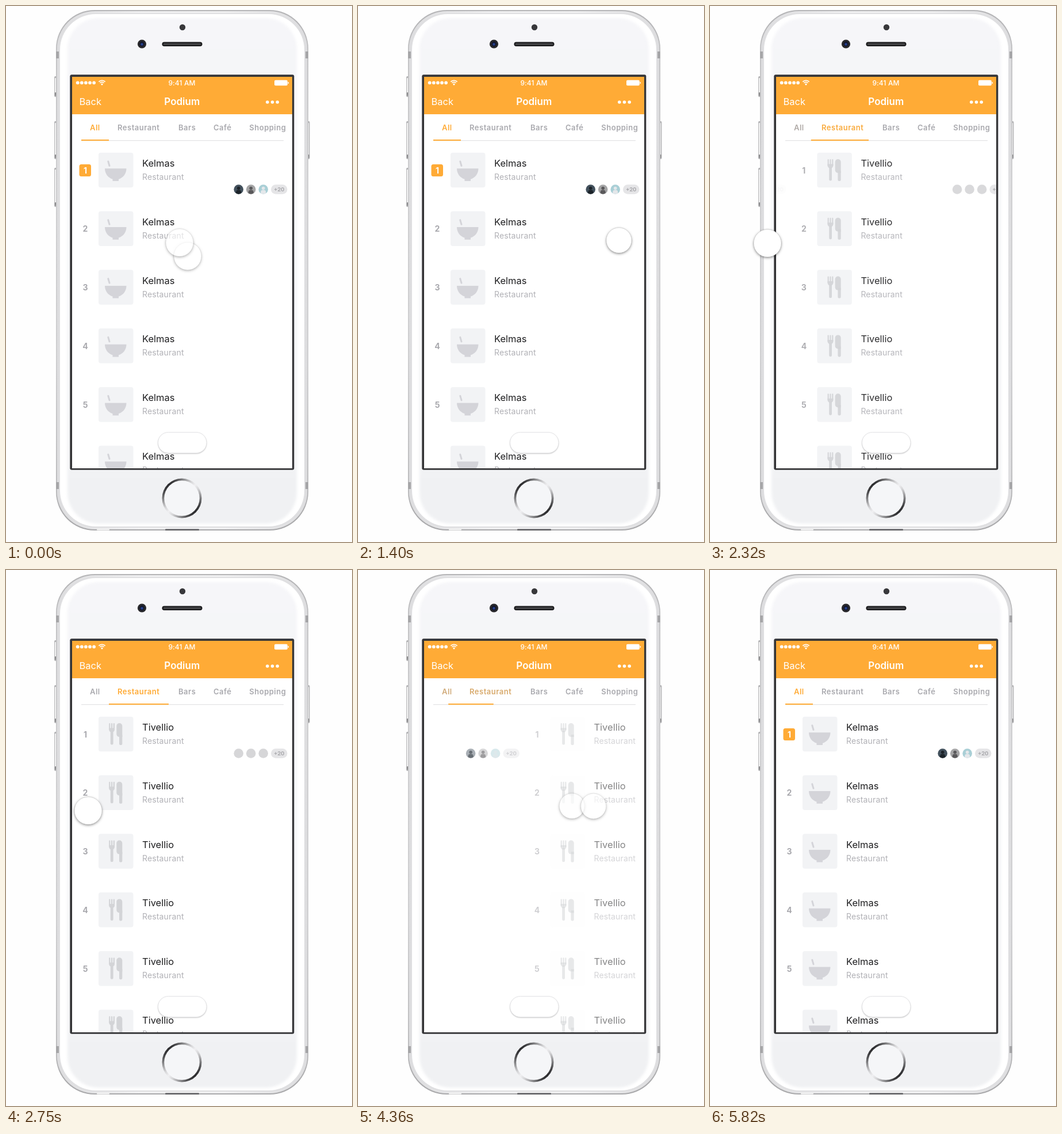
An HTML page with a canvas that plays this animation: 602x931 px, repeating every 6050 ms.

```html
<!DOCTYPE html>
<html lang="en">
<head>
<meta charset="utf-8">
<title>Podium swipe</title>
<style>
html, body { margin: 0; width: 100%; height: 100%; overflow: hidden; background: #fefefe; }
canvas { display: block; width: 602px; height: 931px; }
</style>
</head>
<body>
<canvas id="stage"></canvas>
<script>
const W = 602, H = 931, LOOP = 6050, STEP = 66, TICK = 33;
const ORANGE = [255, 171, 54], GREY = [169, 169, 174];
const FONT = 'Inter, "Liberation Sans", sans-serif';
const SCREEN = { x: 115, y: 123, w: 383, h: 680 };
const PAGE = 382, ROW = 101.8;
const SWIPE = 1780, RETURN = 4088, DRAG = 412, SETTLE = 900;

const canvas = document.getElementById('stage');
const g = canvas.getContext('2d');
const dpr = window.devicePixelRatio || 1;
canvas.width = W * dpr;
canvas.height = H * dpr;

// Legs of the finger's path: begin, end, x, y
const legs = [
  [-66, 0, 302, 411],
  [0, 500, 283, 413],
  [700, 1386, 454, 407],
  [SWIPE, SWIPE + DRAG, 100, 412],
  [2400, 2706, 143, 418],
  [2800, 3560, 179, 408],
  [RETURN, RETURN + DRAG, 496, 411],
  [4900, 5350, 372, 440],
  [5350, 5760, 650, 990]
];

const clamp = u => Math.max(0, Math.min(1, u));
const lerp = (a, b, u) => a + (b - a) * u;
const sway = u => (1 - Math.cos(Math.PI * clamp(u))) / 2;
const glide = u => 1 - (1 - clamp(u) ** 2) ** 7;
const rgb = c => `rgb(${c.map(Math.round).join(',')})`;
const mix = (a, b, u) => rgb(a.map((v, i) => lerp(v, b[i], u)));

const pageAt = t => glide((t - SWIPE - 20) / SETTLE) - glide((t - RETURN - 9) / SETTLE);

function fingerAt(t) {
  let x = 330, y = 458;
  for (const [from, to, nx, ny] of legs) {
    const u = sway((t - from) / (to - from));
    x = lerp(x, nx, u);
    y = lerp(y, ny, u);
  }
  const held = [SWIPE, RETURN].some(s => t > s - 470 && t < s + DRAG);
  return { x, y, r: held ? 22.5 : 24.5 };
}

function box(x, y, w, h, r, fill) {
  g.beginPath();
  g.roundRect(x, y, w, h, r);
  g.fillStyle = fill;
  g.fill();
}

function disc(x, y, r, fill) {
  g.beginPath();
  g.arc(x, y, r, 0, Math.PI * 2);
  g.fillStyle = fill;
  g.fill();
}

function text(str, x, y, size, weight, fill, align = 'left', spacing = 0) {
  g.font = `${weight} ${size}px ${FONT}`;
  g.letterSpacing = spacing + 'px';
  g.textAlign = align;
  g.fillStyle = fill;
  g.fillText(str, x, y);
}

function ramp(x0, y0, x1, y1, ...colors) {
  const grad = g.createLinearGradient(x0, y0, x1, y1);
  colors.forEach((c, i) => grad.addColorStop(i / (colors.length - 1), c));
  return grad;
}

function shadow(color, blur, dy) {
  g.shadowColor = color;
  g.shadowBlur = blur * dpr;
  g.shadowOffsetY = dy * dpr;
}

function sideButton(x, y, h) {
  box(x, y, 5, h, 2, '#b4b4b6');
  box(x + 1, y + 3, 2.5, h - 6, 1, '#f4f4f4');
  box(x + 1, y + h - 8, 3, 6, 1, '#8c8c8e');
}

function drawHomeButton(x, y) {
  const ring = g.createConicGradient(-Math.PI * .75, x, y);
  const stops = 24;
  for (let i = 0; i <= stops; i++) {
    const shine = 1 - Math.abs(Math.cos(i / stops * Math.PI * 2)) ** 1.5;
    ring.addColorStop(i / stops, rgb([0, 0, 2].map(c => c + lerp(45, 240, shine))));
  }
  disc(x, y, 34.5, ring);
  disc(x, y, 30.8, '#f5f6f8');
}

function drawPhone() {
  sideButton(84, 122, 36);
  sideButton(84, 200, 66);
  sideButton(84, 281, 68);
  sideButton(523.5, 200, 66);

  box(87, 7, 439, 904, 67, ramp(0, 7, 0, 911, '#b5b5b7', '#c9c9cb', '#c9c9cb', '#a9a9ab'));
  box(88.5, 9, 436, 900, 66, ramp(88, 0, 525, 0, '#dcdcde', '#f0f0f1', '#f0f0f1', '#dcdcde'));
  for (const y of [79, 827]) {
    box(87, y, 6, 12, 0, '#a6a6a8');
    box(520, y, 6, 12, 0, '#a6a6a8');
  }
  box(92, 12, 429, 894, 63, '#dfdfe1');
  box(94, 14, 425, 890, 62, '#ffffff');
  g.save();
  g.filter = 'blur(2px)';
  box(107, 21, 399, 878, 54, ramp(0, 20, 0, 900, '#f6f6f9', '#f4f5f7', '#f0f1f3'));
  g.restore();
  box(277, 908.5, 59, 2.5, 1, '#5b5b5e');
  box(158, 908, 22, 2.5, 1, '#f5f5f5');

  disc(307, 37, 5.2, '#38383b');
  disc(236.5, 66, 7.6, '#29292c');
  disc(236.5, 66, 4.4, '#14172c');
  disc(236.5, 66.5, 2.3, '#25408c');
  box(271.5, 62.5, 70, 7.5, 3.75, '#18181a');
  box(273.5, 64.5, 66, 3.5, 1.75, '#414144');
  drawHomeButton(306, 855);

  box(111.3, 119.3, 390, 686.5, 3, '#353537');
  box(SCREEN.x, SCREEN.y, SCREEN.w, SCREEN.h, 0, '#ffffff');
}

function drawBowl() {
  g.fillStyle = g.strokeStyle = '#d4d4d9';
  g.beginPath();
  g.moveTo(172, 282.3);
  g.lineTo(209.5, 282.3);
  g.bezierCurveTo(209.5, 291, 204, 298.5, 196, 300.8);
  g.lineTo(196, 304);
  g.lineTo(185.5, 304);
  g.lineTo(185.5, 300.8);
  g.bezierCurveTo(177.5, 298.5, 172, 291, 172, 282.3);
  g.fill();
  g.lineWidth = 3;
  g.lineCap = 'round';
  g.beginPath();
  g.moveTo(177.8, 270);
  g.lineTo(180, 277.5);
  g.stroke();
}

function drawCutlery() {
  const c = '#d3d4d7';
  for (let i = 0; i < 3; i++) box(179.2 + i * 3.8, 266, 2.2, 12, 1.1, c);
  box(179.2, 274.5, 9.8, 7.5, [0, 0, 5, 5], c);
  box(181.8, 279, 4.8, 24.5, 2.2, c);
  box(192.3, 266, 10, 24, [5, 5, 0, 5], c);
  box(197, 286, 5.3, 18, [0, 0, 2.6, 2.6], c);
}

function drawAvatar(x, back, figure) {
  disc(x, 318.5, 8.3, back);
  if (!figure) return;
  g.save();
  g.clip();
  disc(x, 316.5, 2.8, figure);
  box(x - 4.5, 319.5, 9, 9, 4, figure);
  g.restore();
}

function drawRow(page, i, alpha) {
  const best = !page && i === 0;
  g.save();
  g.translate(0, i * ROW);
  g.globalAlpha = Math.max(0, 2 * alpha - 1);
  box(161, 254.7, 60.5, 60.5, 4, '#f2f3f5');
  g.globalAlpha = alpha;
  if (page) drawCutlery(); else drawBowl();
  if (best) box(127.5, 275, 20.5, 21, 3.5, rgb(ORANGE));
  if (i < 5) text(i + 1, 138, 290.5, 14, 700, best ? '#fff' : rgb(GREY), 'center');
  text(page ? 'Tivellio' : 'Kelmas', 237, 279, 16.5, 400, '#1f1f21');
  text('Restaurant', 237, 302, 14, 400, '#b1b1b6', 'left', .15);
  g.restore();
}

function drawPage(page, dx, alpha) {
  if (alpha <= .002) return;
  const photos = [['#42505c', '#1c2329'], ['#a5a5a6', '#5a595b'], ['#a9cfd6', '#e4e7ea']];
  g.save();
  g.translate(dx, 0);
  for (let i = 0; i < 6; i++) drawRow(page, i, alpha);
  g.globalAlpha = alpha;
  photos.forEach((tones, i) => drawAvatar(404.7 + i * 21.5, ...(page ? ['#d6d6d8'] : tones)));
  box(461, 310.3, 28.5, 16.4, 8.2, '#e5e5e7');
  text('+20', 475.2, 322, 9.5, 700, '#a9a9ad', 'center');
  g.restore();
}

function drawHeader() {
  box(SCREEN.x, SCREEN.y, SCREEN.w, 65, 0, rgb(ORANGE));
  for (let i = 0; i < 5; i++) disc(124.7 + i * 7.1, 133.3, 2.9, '#fff');
  g.strokeStyle = '#fff';
  g.lineWidth = 1.7;
  g.lineCap = 'butt';
  for (const r of [8, 5]) {
    g.beginPath();
    g.arc(167, 137.3, r, -Math.PI * .75, -Math.PI * .25);
    g.stroke();
  }
  disc(167, 136, 1.6, '#fff');
  text('9:41 AM', 306, 138, 12, 500, '#fff', 'center', .1);
  box(467, 128.8, 22.8, 9.4, 2, '#fff');
  box(490.5, 131.7, 1.5, 3.6, .8, '#fff');
  text('Back', 127.5, 172, 16.5, 400, '#fff');
  text('Podium', 306.3, 172, 17, 600, '#fff', 'center');
  for (let i = 0; i < 3; i++) disc(454.8 + i * 8.7, 167, 2.8, '#fff');
}

function drawTabs(p) {
  const tabs = [['All', 146], ['Restaurant', 194], ['Bars', 300], ['Café', 361], ['Shopping', 423.3]];
  tabs.forEach(([label, x], i) => {
    const lit = i === 0 ? 1 - p : i === 1 ? p : 0;
    text(label, x, 216.3, 13, 600, mix(GREY, ORANGE, lit), 'left', .5);
  });
  box(131, 233.3, 352, 1, 0, '#dcdcdf');
  box(lerp(131, 179, p), 232, lerp(48, 104, p), 2, 0, rgb(ORANGE));
}

function drawPill() {
  g.save();
  shadow('rgba(0,0,0,.28)', 2, 1);
  box(264.5, 740.5, 84.5, 36, 18, '#fff');
  g.restore();
  g.strokeStyle = '#dddde0';
  g.lineWidth = .8;
  g.stroke();
}

// The shadow is kept outside the disc, so a faint disc stays white
function drawFinger({ x, y, r }, alpha) {
  g.save();
  g.globalAlpha = alpha;
  g.save();
  g.beginPath();
  g.rect(0, 0, W, H);
  g.arc(x, y, r - .5, 0, Math.PI * 2);
  g.clip('evenodd');
  shadow('rgba(0,0,0,.45)', 4, 1.5);
  disc(x, y, r - .5, '#fff');
  g.restore();
  disc(x, y, r - .5, '#fff');
  g.strokeStyle = 'rgba(0,0,0,.14)';
  g.lineWidth = 1;
  g.stroke();
  g.restore();
}

// Two exposures per picture, so quick moves leave a double image
function drawTouch(t) {
  const was = fingerAt(t - TICK), now = fingerAt(t);
  const gap = Math.hypot(now.x - was.x, now.y - was.y) + 6 * Math.abs(now.r - was.r);
  const split = clamp(gap / 12);
  if (split > .15) drawFinger(was, .65 * split);
  drawFinger(now, 1 - .35 * split);
}

function render(t) {
  const p = pageAt(t);
  g.setTransform(dpr, 0, 0, dpr, 0, 0);
  g.fillStyle = '#fefefe';
  g.fillRect(0, 0, W, H);
  drawPhone();
  g.save();
  g.beginPath();
  g.rect(SCREEN.x, SCREEN.y, SCREEN.w, SCREEN.h);
  g.clip();
  drawPage(0, -p * PAGE, 1 - p);
  drawPage(1, (1 - p) * PAGE, p);
  drawHeader();
  drawTabs(p);
  drawPill();
  g.restore();
  drawTouch(t);
}

const start = performance.now();
function frame() {
  const t = (performance.now() - start) % LOOP;
  render(Math.floor(t / STEP) * STEP);
  requestAnimationFrame(frame);
}
frame();
</script>
</body>
</html>
```
